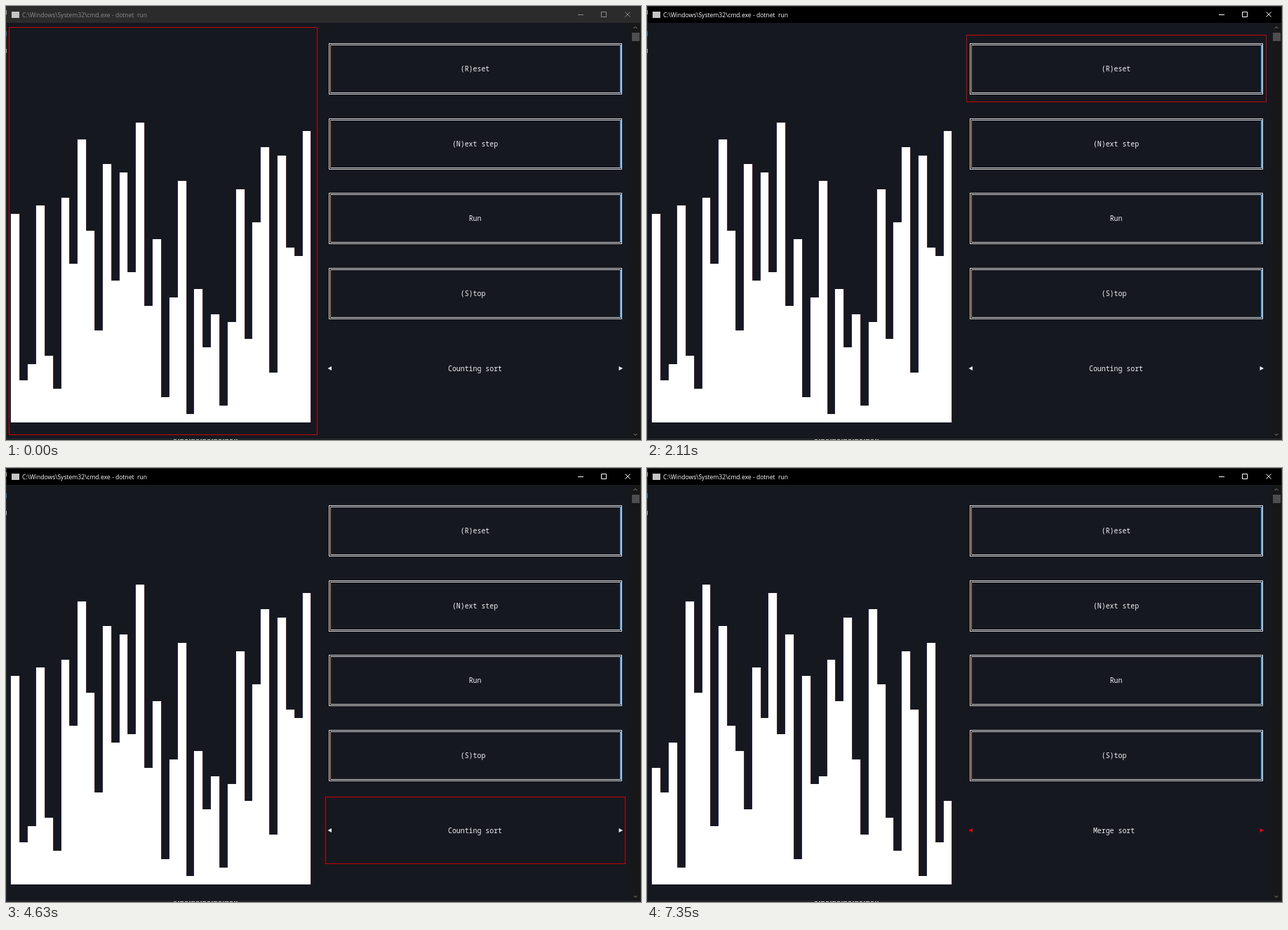
An HTML page for the animation above (8000 ms loop, 905 by 618 pixels).

```html
<!DOCTYPE html>
<html lang="en">
<head>
<meta charset="utf-8">
<title>Sorting console</title>
<style>
  html, body { margin: 0; width: 100%; height: 100%; overflow: hidden; background: #161820; }
  svg { display: block; }
  text { white-space: pre; }
  .title { font: 8.58px "Open Sans", "Noto Sans", sans-serif; }
  .cell { font: 9.88px "Noto Sans Mono", "DejaVu Sans Mono", monospace; fill: #f2f2f2; }
  .crisp { shape-rendering: crispEdges; }
  .line { fill: none; stroke: #d4d4d4; }
</style>
</head>
<body>
<svg width="905" height="618" viewBox="0 0 905 618">
  <rect width="905" height="618" fill="#161820"/>

  <!-- title bar -->
  <rect id="bar" y="1" width="905" height="23"/>
  <rect class="crisp" x="8" y="8" width="11" height="9" fill="#c4c4c4"/>
  <g id="caption">
    <text class="title" x="23" y="15.8" fill="currentColor">C:\Windows\System32\cmd.exe - dotnet&#160; run</text>
    <path d="M815 12.5h8M848.5 8.5h7v7h-7zM882.5 8.5l7 7m0-7l-7 7" fill="none" stroke="currentColor"/>
  </g>

  <!-- scroll bar -->
  <rect x="891" y="24" width="13" height="592" fill="#171717"/>
  <rect class="crisp" x="892" y="38" width="11" height="12" fill="#4d4d4d"/>
  <path d="M894.5 32l2.5-2.5 2.5 2.5M894.5 609l2.5 2.5 2.5-2.5" fill="none" stroke="#858585"/>

  <!-- window edges with scraps of what lies behind -->
  <g class="crisp">
    <path d="M0 .5h905M.5 0v618M904.5 0v618M0 616.5h905" stroke="#2a2d2c"/>
    <path d="M0 617.5h905" stroke="#1a1d22"/>
    <path d="M.5 6v6M.5 61v6" stroke="#a9b0ad"/>
    <path d="M.5 36v7" stroke="#2f78c4"/>
    <path d="M239 617.5h91" stroke="#b5b5b5" stroke-dasharray="4 2 2 1 5 2"/>
  </g>

  <!-- bars with coloured fringes -->
  <use href="#bars" x="-.4" fill="#3434a0"/>
  <use href="#bars" x=".4" fill="#a04a34"/>
  <use href="#bars" class="crisp" fill="#fff"/>
  <defs><path id="bars"/></defs>

  <g id="buttons"></g>
  <text class="cell" id="method" y="519.6"></text>
  <path id="arrows" d="M458.5 516l5.5-3v6zM879 516l-5.5-3v6z"/>
  <rect id="focus" class="crisp" fill="none" stroke="#c80606"/>
</svg>
<script>
const CELL = 5.93, ROW = 11.86, LOOP = 8000;
const $ = id => document.getElementById(id);
const column = n => 1.4 + n * CELL;

const lists = [
  [25, 5, 7, 26, 8, 4, 27, 19, 34, 23, 11, 31, 17, 30, 18, 36, 14, 22,
   3, 15, 29, 1, 16, 9, 13, 2, 12, 28, 10, 24, 33, 6, 32, 21, 20, 35],
  [35, 2, 8, 26, 7, 11, 1, 20, 6, 4, 23, 28, 24, 25, 19, 27, 12, 36,
   5, 9, 32, 13, 3, 31, 15, 10, 14, 21, 30, 33, 16, 22, 18, 17, 34, 29],
  [14, 11, 17, 2, 34, 23, 36, 7, 31, 19, 16, 9, 26, 20, 35, 18, 30, 3,
   25, 12, 13, 27, 22, 32, 15, 6, 33, 24, 8, 4, 28, 21, 1, 29, 5, 10]
];
const methods = [["Counting sort", 105], ["Quick sort", 106], ["Merge sort", 106]];

// Focus rectangles: chart, side panel, four buttons, method selector, none
const item = i => [455, Math.floor(41.9 + 9 * ROW * i), 427, 95];
const stops = [
  [0, [4, 30, 439, 580]],
  [900, [448, 30, 440, 580]],
  [2110, item(0)],
  [2610, item(1)],
  [3030, item(2)],
  [3530, item(3)],
  [4630, item(4)],
  [5640, null]
];

function barPath(list) {
  const edge = i => Math.round(7.45 + i * ROW);
  const steps = list.map((h, i) => `V${Math.round(592.75 - h * ROW)}H${edge(i + 1)}`);
  return `M${edge(0)} 593${steps.join("")}V593z`;
}

function button(label, col, i) {
  const y = Math.round(53 + 9 * ROW * i);
  return `<g class="crisp">
    <rect class="line" x="460.5" y="${y + .5}" width="417" height="72"/>
    <path class="line" d="M462 ${y + 2.5}h414M462 ${y + 70.5}h414"/>
    <path d="M462.5 ${y + 2}v69" stroke="#c48d5c"/>
    <path d="M875.5 ${y + 2}v69" stroke="#5ba9e6" stroke-width="2"/></g>
    <text class="cell" x="${column(col)}" y="${y + 39.9}">${label}</text>`;
}

const paths = lists.map(barPath);
$("buttons").innerHTML = [["(R)eset", 109], ["(N)ext step", 107], ["Run", 111], ["(S)top", 109]]
  .map(([label, col], i) => button(label, col, i)).join("");

function draw(t) {
  const active = t >= 700;
  $("bar").setAttribute("fill", active ? "#000" : "#2b2b2b");
  $("caption").setAttribute("color", active ? "#fff" : "#8c8c8c");

  const box = stops.filter(([from]) => t >= from).pop()[1];
  $("focus").style.display = box ? "" : "none";
  if (box) ["x", "y", "width", "height"].forEach((name, i) =>
    $("focus").setAttribute(name, box[i] + (i < 2 ? .5 : 0)));
  $("arrows").setAttribute("fill", box ? "#f2f2f2" : "#f00000");

  const n = t < 6440 ? 0 : t < 7350 ? 1 : 2;
  const [name, col] = methods[n];
  $("bars").setAttribute("d", paths[n]);
  $("method").textContent = name;
  $("method").setAttribute("x", column(col + 1));
}

function tick() {
  draw(performance.now() % LOOP);
  requestAnimationFrame(tick);
}
tick();
</script>
</body>
</html>
```
